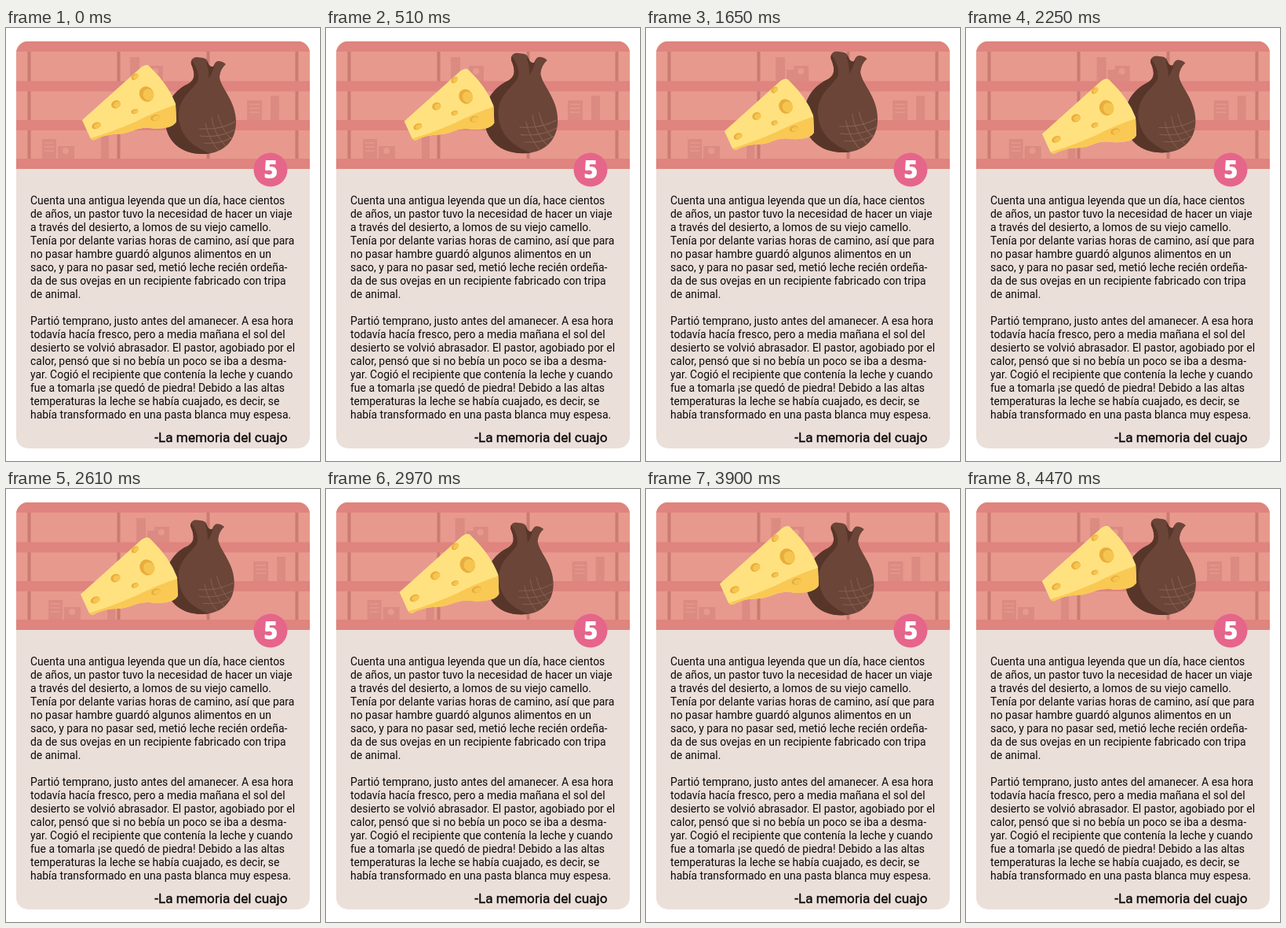
Recreate the animation shown at these times as an HTML page. Size 400 by 550 pixels, loop 4500 ms.

```html
<!DOCTYPE html>
<html lang="es">
<head>
<meta charset="utf-8">
<style>
html, body { margin: 0; width: 100%; height: 100%; overflow: hidden; background: #fff; }
svg { display: block; width: 400px; height: 550px; }
text { font-family: Roboto, sans-serif; fill: #0c0a0a; }
.title { font-size: 17.2px; text-anchor: end; stroke: #0c0a0a; stroke-width: .35px; }
.badge { font: 800 31px "Open Sans", sans-serif; text-anchor: middle; fill: #fff; }
</style>
</head>
<body>
<svg viewBox="0 0 400 550">
  <defs>
    <clipPath id="card"><rect x="13" y="17" width="374" height="517" rx="15"/></clipPath>
    <clipPath id="sackClip"><use href="#sackShape"/></clipPath>
    <clipPath id="cheeseClip"><use href="#cheeseShape"/></clipPath>
  </defs>
  <g clip-path="url(#card)">
    <rect width="400" height="550" fill="#ebdfda"/>
    <rect x="13" y="17" width="374" height="162" fill="#e8998e"/>
    <g id="posts" fill="#c97c71"></g>
    <g id="books" fill="#db8b82">
      <path d="M158 37h12v31h-12zM172 53h9v15h-9zM181 48h19v20h-19zM307 92h19v25h-19zM337 86h11v31h-11zM46 141h18v25h-18zM66 150h21v16h-21zM121 137h10v29h-10z"/>
      <path d="M310 97h13M310 102h13M310 107h13M49 146h12M49 151h12M49 156h12" stroke="#e8998e" stroke-width="1.5"/>
      <circle cx="76" cy="156" r="4" fill="#e8998e"/>
      <circle cx="190" cy="55" r="4" fill="#e8998e"/>
    </g>
    <g id="shelves" fill="#df847e"></g>
  </g>

  <g id="sack">
    <path id="sackShape" fill="#6a4538" d="M236 46C235 41 238 37 243 37L251 38Q256 39 257 43Q259 50 264 49Q266 43 270 42Q276 42 280 46Q273 52 272 62C273 76 293 92 293 119C293 145 276 160 250 160C222 160 202 142 203 115C203 96 214 81 228 73C239 68 243 62 236 46Z"/>
    <g clip-path="url(#sackClip)" fill="none">
      <path fill="#573629" d="M236 40Q248 56 244 68C236 80 222 88 220 108C219 136 238 152 262 160L240 168H196V90Z"/>
      <path fill="#573629" d="M257 43Q259 50 264 49L266 46Q263 58 258 64Q259 54 255 44Z"/>
      <path stroke="#866253" d="M246 128Q272 130 292 119M247 137Q271 140 292 129M252 146Q272 148 288 139M262 113Q265 135 281 151M270 110Q275 131 289 143M254 121Q258 141 271 156"/>
    </g>
  </g>

  <g id="cheese">
    <path id="cheeseShape" fill="#ffe27f" d="M97 117L172 50Q180 44 184 50Q207 72 216 96L217 119Q214 124 207 126Q194 129 183 127Q172 126 160 131Q150 135 137 135Q124 136 113 142Q109 143 107 139Z"/>
    <g clip-path="url(#cheeseClip)">
      <path fill="#f9c954" d="M108 140Q135 132 165 119Q190 106 218 97V150H108Z"/>
      <g id="holes"></g>
    </g>
  </g>

  <circle cx="337" cy="180" r="21.5" fill="#e6658b"/>
  <text class="badge" x="337.3" y="191">5</text>
  <g id="story" font-size="13.96"></g>
  <text class="title" x="358.5" y="526">-La memoria del cuajo</text>
</svg>
<script>
const LOOP = 4500;
const $ = id => document.getElementById(id);

function add(parent, tag, attrs, content = '') {
  const el = document.createElementNS('http://www.w3.org/2000/svg', tag);
  for (const key in attrs) el.setAttribute(key, attrs[key]);
  el.textContent = content;
  $(parent).append(el);
}

for (const x of [27.5, 141.5, 255.5, 368.5]) {
  add('posts', 'rect', { x, y: 29, width: 4, height: 138 });
}
for (const y of [17, 67.5, 117, 166]) {
  add('shelves', 'rect', { x: 13, y, width: 374, height: 13 });
}

// cx, cy, rx, ry, tilt
const holes = [
  [179, 84, 9, 10, -30], [140, 97, 6, 5, -25], [164, 106, 4.5, 3, -20],
  [115, 124, 6, 4, -25], [164, 62, 5, 3.5, -42], [190, 114, 6, 4, -15]
];
for (const [cx, cy, rx, ry, tilt] of holes) {
  const transform = `rotate(${tilt} ${cx} ${cy})`;
  add('holes', 'ellipse', { cx, cy, rx, ry, transform, fill: '#e9ad3d' });
  add('holes', 'ellipse', { cx: cx + rx * .2, cy: cy + ry * .2, rx: rx * .75, ry: ry * .75, transform, fill: '#f6c550' });
}

const story = `Cuenta una antigua leyenda que un día, hace cientos
de años, un pastor tuvo la necesidad de hacer un viaje
a través del desierto, a lomos de su viejo camello.
Tenía por delante varias horas de camino, así que para
no pasar hambre guardó algunos alimentos en un
saco, y para no pasar sed, metió leche recién ordeña-
da de sus ovejas en un recipiente fabricado con tripa
de animal.

Partió temprano, justo antes del amanecer. A esa hora
todavía hacía fresco, pero a media mañana el sol del
desierto se volvió abrasador. El pastor, agobiado por el
calor, pensó que si no bebía un poco se iba a desma-
yar. Cogió el recipiente que contenía la leche y cuando
fue a tomarla ¡se quedó de piedra! Debido a las altas
temperaturas la leche se había cuajado, es decir, se
había transformado en una pasta blanca muy espesa.`;
story.split('\n').forEach((line, i) => add('story', 'text', { x: 31, y: 224 + i * 17 }, line));

// Scale around (cx, cy), then shift by (dx, dy).
function place(id, cx, cy, dx, dy, scale) {
  $(id).setAttribute('transform',
    `translate(${cx + dx} ${cy + dy}) scale(${scale}) translate(${-cx} ${-cy})`);
}

const start = performance.now();
function draw() {
  const angle = (performance.now() - start) % LOOP / LOOP * 2 * Math.PI;
  const sin = Math.sin(angle), rest = 1 - Math.cos(angle);
  place('books', 0, 0, 4.3 * rest, 0, 1);
  place('sack', 250, 98.5, sin - .3 * rest, -4.4 * sin - .8 * rest, 1 + .057 * sin);
  place('cheese', 157, 94, 0, .7 * sin + 8.7 * rest, 1 - .067 * sin);
  requestAnimationFrame(draw);
}
draw();
</script>
</body>
</html>
```
